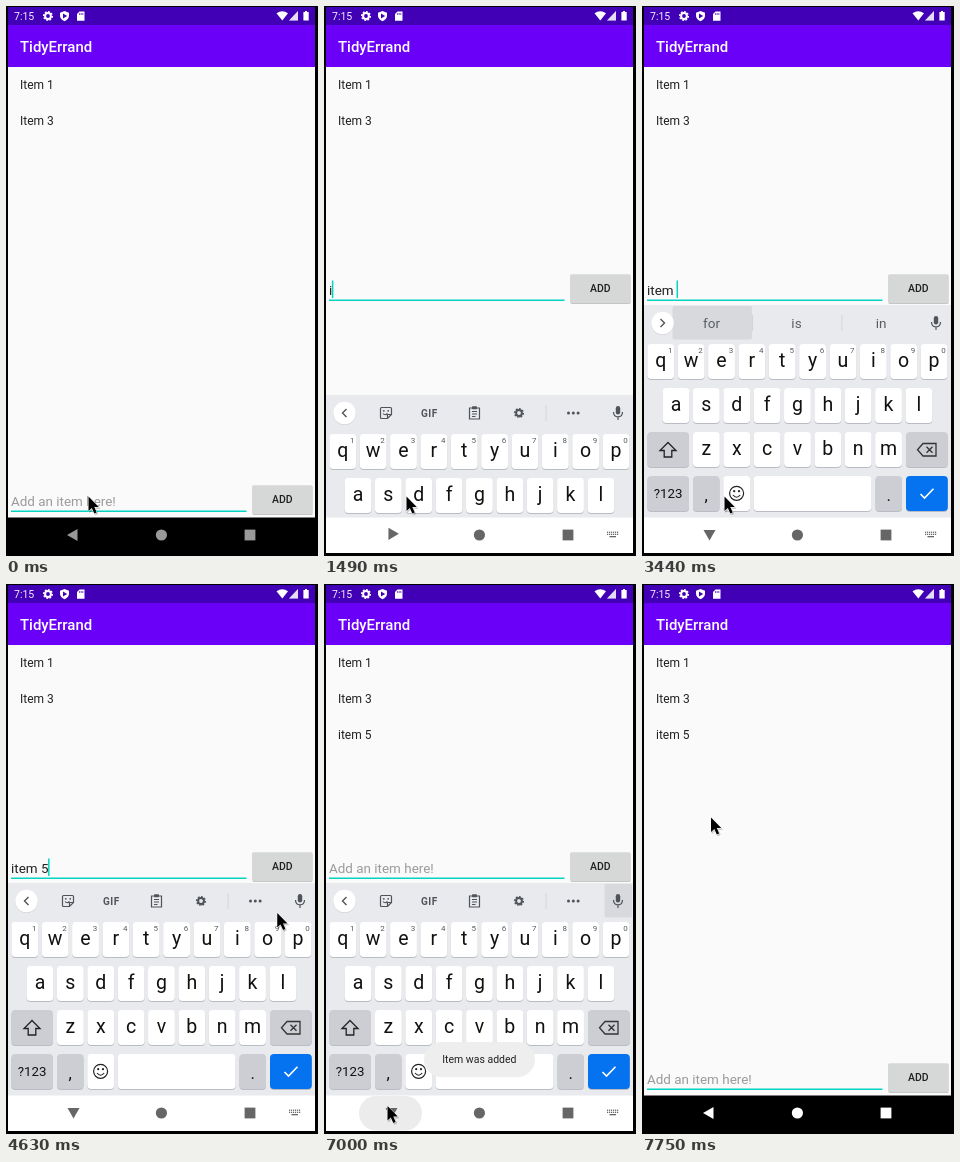
Recreate the animation shown at these times as an HTML page. Size 312x550 px, loop 8000 ms.

```html
<!DOCTYPE html>
<html lang="en">
<head>
<meta charset="utf-8">
<title>Todo list</title>
<style>
html, body { margin: 0; width: 100%; height: 100%; overflow: hidden; background: #000; }
svg { display: block; width: 100%; height: 100%; font-family: Roboto, "Noto Sans", sans-serif; }
text { white-space: pre; }
</style>
</head>
<body>
<script>
const LOOP = 8000, TICK = 149, LIFT = 211;
const TEAL = '#03d5c2', ICON = '#50545a';

function el(tag, attrs = {}, parent, content) {
  const node = document.createElementNS('http://www.w3.org/2000/svg', tag);
  set(node, attrs);
  if (content !== undefined) node.textContent = content;
  if (parent) parent.append(node);
  return node;
}
function set(node, attrs) {
  for (const k in attrs) node.setAttribute(k, attrs[k]);
}
const show = (node, on) => set(node, { visibility: on ? 'inherit' : 'hidden' });
const group = (parent, attrs) => el('g', attrs, parent);
const rect = (p, x, y, w, h, fill, rx = 0) =>
  el('rect', { x, y, width: w, height: h, fill, rx }, p);
const circle = (p, cx, cy, r, attrs) => el('circle', { cx, cy, r, ...attrs }, p);
const path = (p, d, attrs) => el('path', { d, ...attrs }, p);
const line = (p, d, color = ICON, w = 1.2) =>
  path(p, d, { fill: 'none', stroke: color, 'stroke-width': w });
const label = (p, x, y, size, fill, str, more) =>
  el('text', { x, y, 'font-size': size, fill, ...more }, p, str);
const MID = { 'text-anchor': 'middle' };

function gear(p, x, y, color) {
  circle(p, x, y, 2.9, { fill: 'none', stroke: color, 'stroke-width': 2 });
  circle(p, x, y, 4.3, { fill: 'none', stroke: color, 'stroke-width': 1.5,
    pathLength: 16, 'stroke-dasharray': '1.1 .9' });
}

const svg = el('svg', { viewBox: '0 0 312 550', preserveAspectRatio: 'none' }, document.body);
const defs = el('defs', {}, svg);
rect(el('clipPath', { id: 'screen' }, defs), 2, 1, 307, 546, '#000');
rect(svg, 0, 0, 312, 550, '#000');
const screen = group(svg, { 'clip-path': 'url(#screen)' });

// App
rect(screen, 2, 60, 307, 452, '#fafafa');
rect(screen, 2, 19, 307, 42, '#6a00f7');
rect(screen, 2, 1, 307, 18, '#4100b6');
label(screen, 14, 45.5, 14.95, '#fff', 'TidyErrand', { 'font-weight': 500 });

label(screen, 8, 14, 10.5, '#f3edff', '7:15');
gear(screen, 42, 10, '#fff');
path(screen, 'M58.5 5L63 6.8V10Q62.6 13.500 58.500 15.300Q54.400 13.500 54 10V6.800Z', { fill: '#fff' });
path(screen, 'M57 7.600L61.200 10L57 12.400Z', { fill: '#4100b6' });
path(screen, 'M73.500 5.500H78.500V14.800H71V8Z', { fill: '#fff' });
line(screen, 'M73.600 7v2M75.200 7v2M76.800 7v2', '#4100b6', .7);
path(screen, 'M270.500 7.300Q276.300 3.200 282 7.300L276.300 14.500Z', { fill: '#fff' });
path(screen, 'M292 5V14.500H283Z', { fill: '#fff', 'fill-opacity': .45 });
path(screen, 'M288.500 8.700V14.500H283ZM292 5V14.500H283Z', { fill: '#fff', 'fill-opacity': .75 });
path(screen, 'M299 5H301V6H302.700V14.500H297.400V6H299Z', { fill: '#fff' });

const items = ['Item 1', 'Item 3', 'item 5'].map((s, i) =>
  label(screen, 14, 83.3 + i * 35.8, 12, '#212121', s));

// Entry row
const entry = group(screen);
const field = label(entry, 5, 499.5, 13.45, '#222', '');
rect(entry, 5, 504.5, 235.5, 1.5, TEAL);
const caret = rect(entry, 5, 485.5, 1.5, 17.5, TEAL);
rect(entry, 246.5, 480, 60, 29, '#c4c5c5', 1.5);
const button = rect(entry, 246, 479.2, 60.5, 28.8, '#d6d7d7', 1.5);
label(entry, 276.4, 497.3, 10.46, '#1f1f1f', 'ADD', { 'font-weight': 500, ...MID });

// Keyboard
const board = group(screen);
rect(board, 2, 299, 307, 260, '#e8eaed');
const hover = rect(board, 0, 300, 44, 33.5, '#d7d9dd', 2);
circle(board, 20.5, 317.6, 11.5, { fill: '#d5d7da' });
circle(board, 20.5, 317, 11.2, { fill: '#fff' });
const chevron = line(board, 'M22.500 313L18.500 317L22.500 321', ICON, 1.4);

const tools = group(board);
line(tools, 'M57.500 311.500H66.500Q67.500 311.500 67.500 312.500V318.500L63.500 322.500H57.500Q56.500 322.500 56.500 321.500V312.500Q56.500 311.500 57.500 311.500ZM67.500 318.500H63.500V322.500M59 317.500Q61 320 63.500 317.500');
circle(tools, 59.8, 314.8, .9, { fill: ICON });
circle(tools, 64.2, 314.8, .9, { fill: ICON });
label(tools, 105.3, 320.6, 10, ICON, 'GIF', { 'font-weight': 700, 'letter-spacing': .5, ...MID });
line(tools, 'M145.500 312H155.500V323H145.500ZM148 315.500H153M148 318H153M148 320.500H151.500');
rect(tools, 148, 310.2, 5, 3, ICON, .8);
gear(tools, 195, 317, ICON);
rect(tools, 221.7, 309, .8, 16, '#d0d2d6');
for (const x of [244.5, 249.3, 254.1]) circle(tools, x, 317, 1.5, { fill: ICON });

const hints = group(board);
const words = [69.5, 154.5, 239].map(x => label(hints, x, 321.7, 13.5, '#5a5e63', '', MID));
for (const x of [110, 199.5]) rect(hints, x, 309, .8, 16, '#cdcfd3');

rect(board, 291.8, 310, 4.4, 8.5, ICON, 2.2);
line(board, 'M289.500 316Q289.500 320.800 294 320.800Q298.500 320.800 298.500 316M294 320.800V324');

function key(x, y, w, fill, str, size = 19.5, base = 23.2) {
  rect(board, x, y + 1, w, 35, '#b9bcc2', 4);
  rect(board, x, y, w, 35, fill, 4);
  if (str) label(board, x + w / 2, y + base, size, '#111', str, MID);
}
const SOFT = '#ccced4';
[['qwertyuiop', 5.4, 338], ['asdfghjkl', 20.6, 382], ['zxcvbnm', 51, 426]].forEach(([row, x0, y], r) =>
  [...row].forEach((c, i) => {
    const x = x0 + i * 30.36;
    key(x, y, 26.8, '#fff', c);
    if (!r) label(board, x + 22.8, y + 9, 8, '#55595e', (i + 1) % 10, MID);
  }));
key(5.4, 426, 41.6, SOFT);
line(board, 'M26 436.500L34 444.500H29.800V451H22.200V444.500H18Z', '#222', 1.3);
key(264, 426, 41.8, SOFT);
line(board, 'M281 437.500H294V450H281L275.500 443.700ZM284.500 440.700L290.500 446.800M290.500 440.700L284.500 446.800', '#333', 1.3);
key(5.4, 470, 41.6, SOFT, '?123', 13.3, 22.3);
key(51, 470, 26.5, SOFT, ',', 17, 25);
key(81.3, 470, 26.8, '#fff');
circle(board, 94.6, 487.3, 7, { fill: 'none', stroke: '#222', 'stroke-width': 1.2 });
for (const x of [92.2, 97]) circle(board, x, 485.2, 1.1, { fill: '#222' });
line(board, 'M91 489Q94.600 493.500 98.200 489', '#222');
key(111.7, 470, 117.8, '#fff');
key(233.5, 470, 26.5, SOFT, '.', 17, 25);
key(264, 470, 41.8, '#0573f0');
line(board, 'M278.500 488L282.500 492L291.500 482.700', '#fff', 1.6);

// Navigation bar
const navBar = rect(screen, 2, 511.5, 307, 37, '#000');
const ripple = rect(screen, 35, 512, 63, 34.5, '#ececec', 17);
const nav = group(screen);
const back = path(nav, 'M61 529L71.500 523V535Z');
circle(nav, 155.4, 529, 5.6);
rect(nav, 238.6, 523.6, 10.8, 10.8, 'inherit').removeAttribute('fill');
const switcher = group(nav);
for (let i = 0; i < 12; i++)
  rect(switcher, 283 + i % 6 * 2, 525.6 + (i / 6 | 0) * 2.1, 1.2, 1.3, 'currentColor').removeAttribute('fill');
el('rect', { x: 285.5, y: 530, width: 6.5, height: 1.3 }, switcher);

// Toast
const toast = group(screen);
rect(toast, 100, 458, 111, 35, '#eeeeee', 17.5);
label(toast, 155.3, 479.3, 10.5, '#222', 'Item was added', MID);

const pointer = group(svg);
const ARROW = 'M0 0V14.500L3.300 11.500L5.800 17L8.200 16L5.800 10.600H10.300Z';
path(pointer, ARROW, { fill: '#000', opacity: .2, transform: 'translate(1 1.3)', stroke: '#000' });
path(pointer, ARROW, { fill: '#000', stroke: '#fff', 'stroke-width': 1, 'paint-order': 'stroke' });

// Timelines: [start, value], held until the next entry
const TEXT = [[0, ''], [1200, 'i'], [2390, 'it'], [2690, 'ite'], [2990, 'item'],
  [3440, 'item '], [3580, 'item 5'], [5370, '']];
const WORDS = [[0, null], [2690, ['ite', 'item', 'items']], [3140, ['item', 'items', 'its']],
  [3440, ['for', 'is', 'in']], [3880, null]];
const HOVER = [[0, null], [1640, [40, 44]], [2690, [30.5, 79.5]], [3880, null], [5070, [280.5, 27.5]]];
const CARET = [[0, 0], [150, 1], [600, 0], [1200, 1], [1790, 0], [2240, 1], [4180, 0], [4630, 1],
  [5070, 0], [5370, 1], [5960, 0], [6410, 1], [6850, 0], [7450, 1], [7750, 0]];
const DROP = [[0, 260], [1490, 90], [1640, 0], [7150, 110], [7300, 260]];
const TURN = [[0, 0], [1340, -14], [1490, -60], [1640, -90], [7150, -50], [7300, 0]];
const TOAST = [[0, 0], [5370, .45], [5510, 1], [7300, .9], [7450, .4], [7600, 0]];
const RIPPLE = [[0, 0], [6850, .5], [7000, 1], [7150, .5], [7300, 0]];
const NAV = [[0, '#999'], [1490, '#666'], [7300, '#fff']];
const PATH = [[0, 82.5, 490.5], [3730, 82.5, 490.5], [4780, 284, 318], [4930, 284, 318],
  [5220, 271, 280], [5810, 271, 280], [6110, 258, 292], [6850, 63.5, 522],
  [7300, 63.5, 522], [7748, 69, 233.500]];

const at = (table, t) => table.findLast(row => row[0] <= t)[1];
const within = (t, a, b) => t >= a && t < b;

function along(t) {
  const i = PATH.findLastIndex(p => p[0] <= t);
  const a = PATH[i], b = PATH[i + 1];
  if (!b) return a.slice(1);
  const u = (t - a[0]) / (b[0] - a[0]), e = u * u * (3 - 2 * u);
  return [a[1] + (b[1] - a[1]) * e, a[2] + (b[2] - a[2]) * e];
}

function draw(t) {
  const str = at(TEXT, t), list = at(WORDS, t), box = at(HOVER, t);
  const open = within(t, 1490, 7300);

  field.textContent = str || (t < 1200 || t >= 5370 ? 'Add an item here!' : '');
  set(field, { fill: str ? '#222' : '#9b9b9b' });
  set(caret, { x: str ? 4.6 + field.getComputedTextLength() : 5 });
  show(caret, at(CARET, t));
  set(entry, { transform: `translate(0 ${within(t, 1490, 7150) ? -LIFT : 0})` });
  set(button, { fill: within(t, 5220, 5660) ? '#cfd0d0' : '#d6d7d7' });
  show(items[2], t >= 5370);

  show(board, open);
  set(board, { transform: `translate(0 ${at(DROP, t)})` });
  show(tools, !list);
  show(hints, list);
  if (list) words.forEach((w, i) => { w.textContent = list[i]; });
  set(chevron, { transform: list ? 'rotate(180 20.5 317)' : '' });
  show(hover, box);
  if (box) set(hover, { x: box[0], width: box[1] });

  set(navBar, { fill: open ? '#fff' : '#000' });
  set(nav, { fill: at(NAV, t) });
  set(back, { transform: `rotate(${at(TURN, t)} 67 528.5)` });
  show(switcher, within(t, 1340, 7300));
  set(ripple, { opacity: at(RIPPLE, t) });
  set(toast, { opacity: at(TOAST, t) });

  const [x, y] = along(Math.floor((t + 4) / TICK) * TICK);
  set(pointer, { transform: `translate(${x} ${y})` });
}

const start = performance.now();
function frame() {
  draw((performance.now() - start) % LOOP);
  requestAnimationFrame(frame);
}
frame();
</script>
</body>
</html>
```
